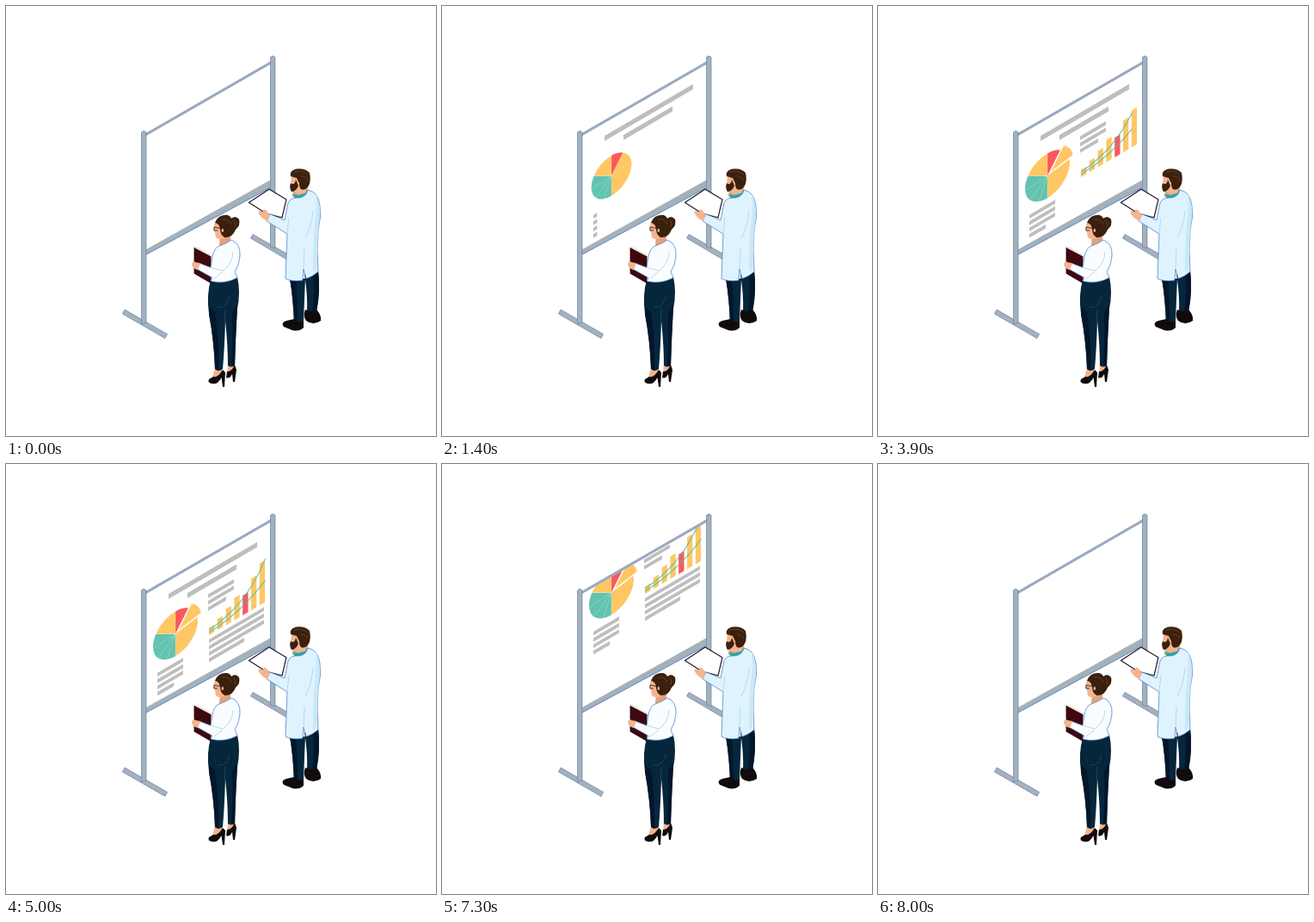
Write an HTML page with a canvas that moves like this. It is 500 by 500 pixels and loops after 8500 ms.

```html
<!DOCTYPE html>
<html lang="en">
<head>
<meta charset="utf-8">
<title>Whiteboard presentation</title>
<style>
html, body { margin: 0; width: 100%; height: 100%; overflow: hidden; background: #fff; }
canvas { display: block; width: 100vw; height: 100vh; }
</style>
</head>
<body>
<canvas id="stage" width="500" height="500"></canvas>
<script>
const ctx = document.getElementById('stage').getContext('2d');
const LOOP = 8500, STEP = 100;
const YELLOW = '#ffc763', RED = '#fb585c', TEAL = '#62c3b0', GREY = '#bebebe';
const STEEL = '#a5b1ba', EDGE = '#6480b0', BLUE = '#3b74c4';
const NAVY = '#06263c', SHADE = '#03162a', SKIN = '#f3b48f', HAIR = '#3b200e', BLACK = '#120b0d';
const SLOPE = 0.585;
const BOARD = new Path2D('M163 151 L308 67.5 V203 L163 284 Z');

const ramp = (k, from, to) => Math.min(1, Math.max(0, (k - from) / (to - from)));
const rad = deg => deg * Math.PI / 180;

function shape(d, fill, stroke, width = 0.7) {
  const path = new Path2D(d);
  if (fill) {
    ctx.fillStyle = fill;
    ctx.fill(path);
  }
  if (stroke) {
    ctx.strokeStyle = stroke;
    ctx.lineWidth = width;
    ctx.stroke(path);
  }
}

function slice(from, to, color, r = 26) {
  ctx.fillStyle = color;
  ctx.beginPath();
  ctx.moveTo(0, 0);
  ctx.arc(0, 0, r, rad(from), rad(to));
  ctx.closePath();
  ctx.fill();
}

// Rows of grey text bars, uncovered from left to right
function rows(x, y, widths, shown, gap = 7.4, h = 4.4) {
  const limit = Math.max(...widths) * shown;
  ctx.fillStyle = GREY;
  widths.forEach((w, i) => ctx.fillRect(x, y + i * gap, Math.min(w, limit), h));
}

function title(p) {
  const limit = 26 + 103 * p;
  ctx.fillStyle = GREY;
  ctx.fillRect(26, 17.2, limit - 26, 6);
  ctx.fillRect(48, 29.2, Math.max(0, Math.min(57, limit - 48)), 5.8);
}

function pie(size, out) {
  if (!size) return;
  ctx.save();
  ctx.translate(34, 68.3);
  ctx.scale(size, size);
  slice(-10, 90, YELLOW);
  slice(90, 210, TEAL);
  slice(210, 270, YELLOW);
  slice(270, 305, RED);
  ctx.strokeStyle = 'rgba(255,255,255,.4)';
  ctx.lineWidth = 0.5;
  for (const a of [90, 112, 140, 175, 210, 270]) {
    ctx.beginPath();
    ctx.moveTo(0, 0);
    ctx.lineTo(26 * Math.cos(rad(a)), 26 * Math.sin(rad(a)));
    ctx.stroke();
  }
  ctx.translate(4.1 * out, -2.6 * out);
  slice(305, 350, YELLOW);
  ctx.restore();
}

function bars(k) {
  [8.5, 13, 19, 26, 23, 37, 49].forEach((h, i) => {
    const start = 27.8 + 1.5 * i;
    const now = h * ramp(k, start, start + 2.5);
    ctx.fillStyle = i === 4 ? RED : YELLOW;
    ctx.fillRect(73 + 9.8 * i, 92.6 - now, 6.3, now);
  });
}

function curves(p) {
  if (!p) return;
  ctx.save();
  ctx.beginPath();
  ctx.rect(72.5, 0, 66.5 * p, 134);
  ctx.clip();
  shape('M73 86.7 Q118 83 138.5 42', null, '#54bba8', 1.2);
  shape('M73 89.7 Q112 88 138.5 67', null, '#54bba8', 1.2);
  ctx.restore();
}

function chart(k) {
  if (k >= 80) return;
  ctx.save();
  ctx.clip(BOARD);
  ctx.translate(163, 149 - 12 * Math.max(0, k - 69));
  ctx.transform(1, -SLOPE, 0, 1, 0, 0);
  title(ramp(k, 0, 9.1));
  pie(ramp(k, 5, 15), ramp(k, 15, 19));
  rows(13, 101.5, [30, 30, 30, 19], ramp(k, 13.3, 18));
  rows(72, 44.7, [30, 30, 21], ramp(k, 21, 27));
  bars(k);
  curves(ramp(k, 30, 40));
  rows(73, 97.6, [64, 64, 64, 41], ramp(k, 41.5, 50));
  ctx.restore();
}

function feet() {
  shape('M138 353 L187.5 381.5 L185 386.5 L135.5 358 Z', STEEL, EDGE);
  shape('M287 265.5 L330 290 L327 295 L284.5 270 Z', STEEL, EDGE);
}

function frame() {
  shape('M163 148 L308 64.5 V67 L163 150.5 Z', STEEL, EDGE, 0.6);
  shape('M163 283 L308 202 V211 L163 289 Z', STEEL);
  shape('M163 289 L308 211', null, BLUE, 0.8);
  shape('M157.5 147 Q160 143.5 163 147 V368 L157.5 370 Z', STEEL, EDGE);
  shape('M307.5 59.5 Q310 56.5 313 59.5 V282 L307.5 280 Z', STEEL, EDGE);
}

function man() {
  // trousers and shoes
  shape('M347 312 L363 308 Q366 330 361 356 L350 356 Q351 336 347 312 Z', NAVY);
  shape('M357 311 L363 308 Q366 330 361 356 L356 356 Q359 335 357 311 Z', SHADE);
  shape('M330 317 L348 317 Q347 340 346 368 L335 369 Q334 340 330 317 Z', NAVY);
  shape('M330 317 L337 318 Q339 345 339 369 L335 369 Q334 340 330 317 Z', SHADE);
  shape('M348 353 Q356 357 361 353 Q367 359 366 366 Q357 372 349 366 Q345 361 348 353 Z', BLACK);
  shape('M335 364 Q341 369 346 367 V374 Q341 379 333 377 L323 373 Q319 368 326 366 Z', BLACK);
  // clipboard
  shape('M282.5 228.5 L306 213 L326 225 L321 246 L302 241 Z', '#fff', '#201a2c', 1.2);
  // coat
  shape('M335 206 H350 L353 222 H333 Z', '#e9a680');
  shape('M333 218 Q341 223 350 214 L352 222 L338 228 Z', '#26aaa8');
  shape('M328 229 Q331 222 341 223 Q349 222 351 214 Q363 216 365 232 Q367 245 363 260 '
    + 'Q361 283 363 309 Q356 315 349 317 L346 306 L345 319 Q333 321 325 317 '
    + 'L327 265 L303 250 L307 242 L324 249 Z', '#dff3fe', BLUE, 0.7);
  shape('M357 238 Q355 258 348 270 M327 264 L329 246 M346 306 L347 282', null, '#a9d3ea', 0.8);
  shape('M360 218 Q368 233 363 260 L361 307 L357 309 Q357 275 359 255 Q362 232 360 218 Z', '#c9e8f8');
  // hand
  shape('M307 243 L304 250 Q298 248 295 243 Q292 239 295 238 L299 240 Q299 235 302 237 Z', SKIN);
  // head
  shape('M332 197 H347 L349 217 Q341 221 335 216 L331 207 Z', SKIN);
  shape('M331 198 Q329 192 337 189.5 Q348 188 353 194 Q355 203 352 209 Q348 215 343 213 '
    + 'Q341 211 341 206 L338 200 Z', HAIR);
  shape('M337 202 L340 209 Q337 216 332 216 Q329 211 331 206 Q336 209 337 202 Z', HAIR);
  shape('M335 193 Q344 190 351 196 M343 198 Q349 198 351 203', null, '#69401f', 1);
}

function woman() {
  // feet and shoes
  shape('M243 421 H252 L249 432 L239 435 Z M258 414 H267 L263 427 L257 430 Z', SKIN);
  shape('M236 434 L241 431 Q246 433 252 423 L255 426 L254 443 H252 L250.5 432 Q246 441 239 439 Q234 438 236 434 Z', BLACK);
  shape('M257 425 Q262 426 266 417 L268 423 L266 437 H264 L263 428 Q260 434 256 432 Z', BLACK);
  // trousers
  shape('M238 319 L269 315 Q273 333 269 352 Q267 385 266 418 Q262 421 258 418 '
    + 'Q258 395 255 366 Q254 400 252 422 Q247 426 243 422 Q242 390 236 358 Q233 335 238 319 Z', NAVY);
  shape('M236 350 L243 356 Q248 388 247 424 L243 422 Q242 390 236 358 Z', SHADE);
  shape('M269 347 Q267 385 266 418 L262 419 Q264 380 263 356 Z', SHADE);
  shape('M246 350 Q256 353 260 338 M254.5 368 L255 352', null, '#184a68', 0.9);
  // book
  shape('M219 281 L238 291 V322 L219 311 Z', '#3f080e', '#1d0508', 0.8);
  shape('M219 281 L222 280 L240 290 L238 291 Z', '#efe4df');
  // blouse
  shape('M249 265 H261 V280 H248 Z', '#e5a27c');
  shape('M248 279 Q255 277 262 272 Q273 276 272 291 Q271 302 266 309 L269 316 '
    + 'Q254 324 238 320 L240 316 L222 306 L225 299 L238 304 L240 291 Q243 280 248 279 Z', '#fafdff', BLUE, 0.7);
  shape('M264 286 Q263 301 252 308 L238 304 M252 309 L242 317', null, '#b6d3e3', 0.9);
  shape('M226 299 L223 307 Q216 305 216 300 Q217 296 221 298 Z', SKIN);
  // head
  shape('M243 251 H254 V270 Q248 273 244 269 L243 263 L241 260 Z', SKIN);
  shape('M243 252 Q246 243 256 243 Q260 243 262 247 Q267 243 271 248 Q273 255 267 260 '
    + 'Q263 270 254 269 Q249 266 249 259 Q248 253 243 252 Z', HAIR);
  shape('M251 259 Q253 258 253 262 Q252 264 250.5 262 Z', SKIN);
  shape('M242 257 L251 259 M242 257 V261 H246', null, '#251b24', 0.8);
  shape('M251 248 Q260 247 262 254 M264 249 Q268 251 266 257', null, '#694023', 0.9);
}

function draw(k) {
  ctx.fillStyle = '#fff';
  ctx.fillRect(0, 0, 500, 500);
  feet();
  chart(k);
  frame();
  man();
  woman();
}

function tick() {
  draw(Math.floor((performance.now() % LOOP) / STEP));
  requestAnimationFrame(tick);
}
tick();
</script>
</body>
</html>
```
